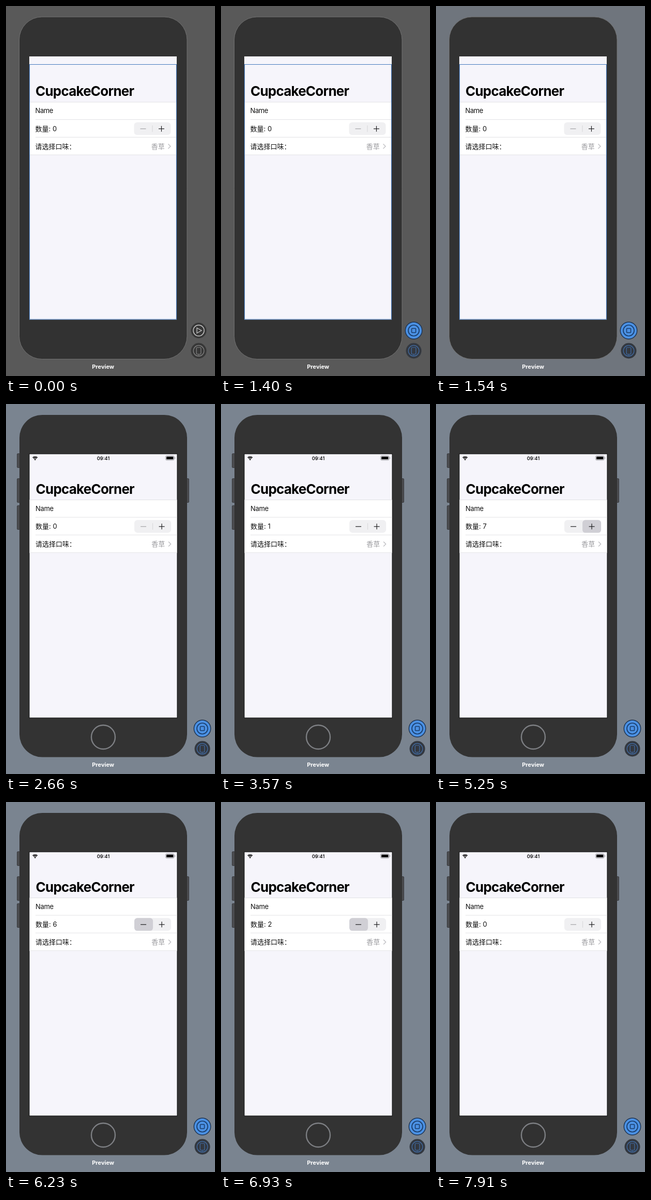
These frames come from a looping animation (404 px wide and 712 px high, 8 s). An HTML page with a canvas:

```html
<!DOCTYPE html>
<html lang="zh-CN">
<head>
<meta charset="utf-8">
<title>Preview</title>
<style>
html, body { margin: 0; width: 100%; height: 100%; overflow: hidden; background: #595959; }
canvas { display: block; width: 404px; height: 712px; }
</style>
</head>
<body>
<canvas id="stage"></canvas>
<script>
const W = 404, H = 712, LOOP = 8000;
const START = 1400, LIVE = 2170;
const PLUS = [3220, 3710, 4100, 4480, 4760, 5000, 5190];
const MINUS = [6090, 6260, 6440, 6615, 6790, 7100, 7490];
const SANS = 'Inter, "Noto Sans CJK SC", "Noto Sans CJK", sans-serif';
const HAN = '"Noto Sans CJK SC", "Noto Sans CJK", sans-serif';

const canvas = document.getElementById('stage');
const ctx = canvas.getContext('2d');
const dpr = window.devicePixelRatio || 1;
canvas.width = W * dpr;
canvas.height = H * dpr;

const clamp = v => Math.max(0, Math.min(1, v));
const mix = (a, b, p) => `rgb(${a.map((v, i) => Math.round(v + (b[i] - v) * p))})`;

function box(x, y, w, h, r, fill, stroke, lw = 1) {
  ctx.beginPath();
  ctx.roundRect(x, y, w, h, r);
  paint(fill, stroke, lw);
}

function disc(x, y, r, fill, stroke, lw = 1) {
  ctx.beginPath();
  ctx.arc(x, y, r, 0, Math.PI * 2);
  paint(fill, stroke, lw);
}

function paint(fill, stroke, lw) {
  if (fill) { ctx.fillStyle = fill; ctx.fill(); }
  if (stroke) { ctx.strokeStyle = stroke; ctx.lineWidth = lw; ctx.stroke(); }
}

function line(points, color, lw = 1, close = false) {
  ctx.beginPath();
  points.forEach(([x, y]) => ctx.lineTo(x, y));
  if (close) ctx.closePath();
  paint(null, color, lw);
}

function text(str, x, y, font, color, align = 'left', tracking = 0) {
  ctx.font = font;
  ctx.fillStyle = color;
  ctx.textAlign = align;
  ctx.letterSpacing = tracking + 'px';
  ctx.fillText(str, x, y);
}

// Strength of the press highlight left by a series of taps
function glow(taps, t) {
  return Math.max(...taps.map(tap => {
    const age = t - tap;
    return age < 0 ? 0 : Math.min(clamp(0.4 + age / 90), clamp(1 - (age - 150) / 180));
  }));
}

const countTaps = (taps, t) => taps.filter(tap => t >= tap).length;

function phone(live) {
  if (live) {
    for (const [x, y, h] of [[21.5, 95.5, 27], [21.5, 143.5, 46], [21.5, 195.5, 46], [347.5, 143.5, 46]])
      box(x, y, 6, h, 1.5, '#4b4c4f', '#3a3c40');
    box(26, 21, 324, 658.5, 44, '#333333');
    disc(188, 641, 23, '#313131', '#7d7f83', 2.4);
    box(44.5, 95.5, 287, 509, 0, '#0c0c0c');
    box(45.5, 96.5, 285, 507, 0, '#f6f5fb');
  } else {
    box(25.5, 21, 324.5, 658.5, 44, '#323232', '#777777', 0.9);
    box(45, 97, 285, 506.5, 0, '#f6f5fb');
    box(45.5, 112.5, 284, 490.5, 0, null, '#4579bd', 1.2);
  }
}

function statusBar() {
  for (const r of [6.6, 4.2]) {
    ctx.beginPath();
    ctx.arc(56.2, 108, r, -Math.PI * 0.75, -Math.PI * 0.25);
    paint(null, '#000', 1.5);
  }
  ctx.beginPath();
  ctx.moveTo(56.2, 108.4);
  ctx.arc(56.2, 108.4, 2.6, -Math.PI * 0.75, -Math.PI * 0.25);
  ctx.closePath();
  paint('#000');
  text('09:41', 188, 107.6, '600 9.2px ' + SANS, '#111', 'center');
  box(308.5, 99.7, 16.5, 8.4, 2.4, null, '#8c8c90', 0.9);
  box(310, 101.2, 13.5, 5.4, 1.2, '#000');
  box(325.9, 102.6, 1, 2.6, 0.5, '#8c8c90');
}

function stepper(x, y, count, t) {
  const down = glow(MINUS, t), up = glow(PLUS, t);
  const shade = p => mix([240, 240, 242], [208, 207, 213], p);
  box(x, y, 71, 24.5, 6, shade(0));
  if (Math.max(down, up) < 0.05) line([[x + 35.5, y + 6], [x + 35.5, y + 18.5]], '#d5d5d8');
  if (down) box(x, y, 36, 24.5, 5.5, shade(down));
  if (up) box(x + 35, y, 36, 24.5, 5.5, shade(up));
  const cy = y + 12.5, mx = x + 17.5, px = x + 53;
  line([[mx - 5.5, cy], [mx + 5.5, cy]], count ? '#1c1c1e' : '#a3a3a6', 1.2);
  line([[px - 5.5, cy], [px + 5.5, cy]], '#1c1c1e', 1.2);
  line([[px, cy - 5.5], [px, cy + 5.5]], '#1c1c1e', 1.2);
}

function form(live, t) {
  const dx = live ? 0.6 : 0, dy = live ? -0.5 : 0;
  const left = live ? 45.5 : 46, right = live ? 330.5 : 329;
  const count = countTaps(PLUS, t) - countTaps(MINUS, t);
  const body = '13px ' + SANS, han = '13px ' + HAN;

  text('CupcakeCorner', 57 + dx, 173 + dy, '700 26px ' + SANS, '#000', 'left', -0.8);
  box(left, 185 + dy, right - left, 102, 0, '#fff');
  for (const [x, y] of [[left, 185], [57, 218.5], [57, 252.5], [left, 286.5]])
    line([[x, y + dy], [right, y + dy]], '#dfdfe3', 0.9);

  text('Name', 56.5 + dx, 206 + dy, body, '#111', 'left', -0.4);
  text('数量', 56.5 + dx, 240.8 + dy, han, '#111');
  text(': ' + count, 82.5 + dx, 240.8 + dy, body, '#111');
  text('请选择口味：', 56.5 + dx, 274.5 + dy, han, '#111');
  text('香草', 306.7 + dx, 274.5 + dy, han, '#9b9b9f', 'right');
  line([[313.5 + dx, 265.5 + dy], [318 + dx, 270 + dy], [313.5 + dx, 274.5 + dy]], '#bcbcc0', 1.3);
  stepper(247.5 + dx, 223.8 + dy, count, t);
}

function controls(running, live, t) {
  const x = live ? 379.5 : 372.5, y = 624.5, y2 = 663.5;
  if (running) {
    disc(x, y, 16.2, '#4b91e4', '#1d3556', 1.5);
    disc(x, y, 10.5, null, '#193b68', 1.7);
    box(x - 4, y - 4, 8, 8, 1, null, '#193b68', 1.5);
  } else {
    const ink = t >= 1260 ? '#e2e2e2' : '#c6c6c6';
    disc(x, y, 15, '#373737');
    disc(x, y, 10.5, null, ink, 1.4);
    line([[x - 3.5, y - 5], [x + 5.5, y], [x - 3.5, y + 5]], ink, 1.3, true);
  }
  const ink = running ? '#426da6' : '#858585';
  disc(x, y2, 15, running ? '#333840' : '#373737');
  disc(x, y2, 10.3, null, ink, 1.2);
  box(x - 4.3, y2 - 6.5, 8.6, 13, 1.6, running ? '#333840' : '#373737', ink, 1.2);
  line([[x - 1.5, y2 + 8.3], [x + 1.5, y2 + 8.3]], ink, 1);
}

function draw(t) {
  const running = t >= START, live = t >= LIVE;
  const tint = 1 - (1 - clamp((t - START) / 600)) ** 4;
  ctx.setTransform(dpr, 0, 0, dpr, 0, 0);
  ctx.fillStyle = mix([89, 89, 89], [122, 132, 144], tint);
  ctx.fillRect(0, 0, W, H);
  phone(live);
  if (live) statusBar();
  form(live, t);
  controls(running, live, t);
  text('Preview', 187.7, 698, '700 11px ' + SANS, '#fff', 'center');
}

const origin = performance.now();
function tick() {
  draw((performance.now() - origin) % LOOP);
  requestAnimationFrame(tick);
}
tick();
</script>
</body>
</html>
```
